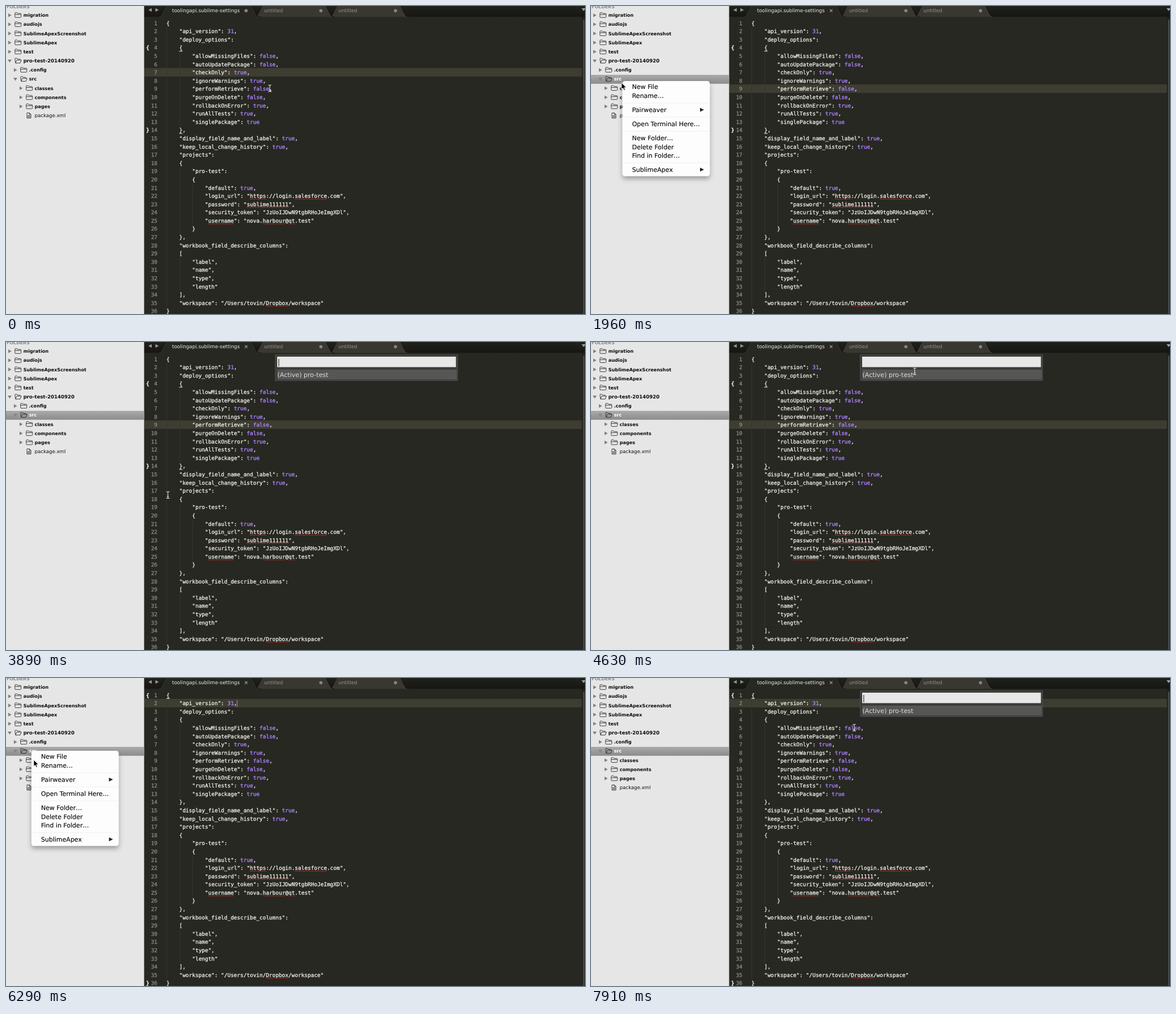
An HTML page that plays this animation: 1025x546 px, repeating every 8000 ms.

```html
<!DOCTYPE html>
<html lang="en">
<head>
<meta charset="utf-8">
<title>Editor session</title>
<style>
html, body { margin: 0; width: 100%; height: 100%; overflow: hidden; background: #272822; }
svg { display: block; width: 1025px; height: 546px; text-rendering: geometricPrecision; }
.code { font: 9.45px "DejaVu Sans Mono", monospace; fill: #f8f8f2; stroke: #f8f8f2; stroke-width: .25px; }
.ui { font-family: "DejaVu Sans", sans-serif; }
.no { fill: #90918b; stroke: #90918b; text-anchor: end; }
.val { fill: #ae81ff; stroke: #ae81ff; stroke-width: .35px; }
.menu { font-size: 11.02px; }
.menu text { stroke-width: .15px; }
</style>
</head>
<body>
<svg id="stage" viewBox="0 0 1025 546" xmlns="http://www.w3.org/2000/svg">
<defs>
  <linearGradient id="row" x2="0" y2="1"><stop stop-color="#ababab"/><stop offset="1" stop-color="#8b8b8b"/></linearGradient>
  <linearGradient id="blue" x2="0" y2="1"><stop stop-color="#5186f6"/><stop offset="1" stop-color="#1b55ee"/></linearGradient>
  <linearGradient id="bar" x2="0" y2="1"><stop stop-color="#21221d"/><stop offset="1" stop-color="#151612"/></linearGradient>
  <filter id="shade" x="-20%" y="-20%" width="140%" height="160%"><feDropShadow dx="0" dy="5" stdDeviation="4" flood-opacity=".32"/></filter>
</defs>
</svg>
<script>
const LOOP = 8000, X0 = 284, CW = 5.69, LH = 14.59, BASE = 33.7;
const stage = document.getElementById('stage');

const source = `{
    "api_version": 31,
    "deploy_options":
    {
        "allowMissingFiles": false,
        "autoUpdatePackage": false,
        "checkOnly": true,
        "ignoreWarnings": true,
        "performRetrieve": false,
        "purgeOnDelete": false,
        "rollbackOnError": true,
        "runAllTests": true,
        "singlePackage": true
    },
    "display_field_name_and_label": true,
    "keep_local_change_history": true,
    "projects":
    {
        "pro-test":
        {
            "default": true,
            "login_url": "https://login.salesforce.com",
            "password": "sublime111111",
            "security_token": "JzUoIJDwN9tgbRHoJeImgXDl",
            "username": "nova.harbour@qt.test"
        }
    },
    "workbook_field_describe_columns":
    [
        "label",
        "name",
        "type",
        "length"
    ],
    "workspace": "/Users/tovin/Dropbox/workspace"
}`.split('\n');

const baseline = n => BASE + (n - 1) * LH;
const colX = c => X0 + c * CW;
const rect = (x, y, w, h, fill, more = '') =>
  `<rect x="${x}" y="${y}" width="${w}" height="${h}" fill="${fill}" ${more}/>`;
const path = (d, more) => `<path d="${d}" ${more}/>`;
const text = (x, y, s, more = '') => `<text x="${x}" y="${y}" ${more}>${s}</text>`;
const dot = x => `<circle cx="${x}" cy="8.3" r="2.9" fill="#85857e"/>`;

function add(html, parent = stage) {
  const g = document.createElementNS('http://www.w3.org/2000/svg', 'g');
  g.innerHTML = html;
  parent.appendChild(g);
  return g;
}
const show = (el, on) => el.setAttribute('visibility', on ? 'inherit' : 'hidden');
const move = (el, x, y) => el.setAttribute('transform', `translate(${x} ${y})`);

// Editor
add(rect(244, 0, 781, 546, '#272822'));
const activeLine = add(rect(245, 0, 775, 15, '#3e3d32'));

const guide = (col, from, to) =>
  rect(Math.round(colX(col)), baseline(from) - 10.7, 1, (to - from + 1) * LH, '#34352e');
add(guide(0, 2, 35) + guide(4, 5, 13) + guide(4, 19, 26) + guide(4, 30, 33) + guide(8, 21, 25));

add(source.map((line, i) => {
  const body = line.trimStart(), y = baseline(i + 1);
  const marked = body.replace(/\b(true|false|31)\b(?=,|$)/, '<tspan class="val">$1</tspan>');
  return text(268, y, i + 1, 'class="no"') + text(colX(line.length - body.length), y, marked);
}).join('')).setAttribute('class', 'code');

const misspelt = [[22, 'https'], [22, 'salesforce'], [23, 'sublime111111'],
  [25, 'username'], [25, 'harbour'], [25, 'qt'], [35, 'Dropbox']];
add(misspelt.map(([n, word]) => {
  const x = colX(source[n - 1].indexOf(word)), y = baseline(n) + 2.2;
  return path(`M${x} ${y}h${word.length * CW}`, 'stroke="#e3211c" stroke-width="1.2" stroke-dasharray="2 1"');
}).join(''));

function bracketPair(open, close, col) {
  const end = (n, ch) => text(248, baseline(n), ch, 'font-weight="bold"') +
    rect(colX(col), baseline(n) + 2, CW, 1.1, '#f8f8f2', 'stroke="none"');
  const g = add(end(open, '{') + end(close, '}'));
  g.setAttribute('class', 'code');
  return g;
}
const innerPair = bracketPair(4, 14, 4);
const outerPair = bracketPair(1, 36, 0);
const caret = add(rect(408.6, 39.5, 1, 12, '#a5a59d'));
add(rect(1019.5, 20, 6, 526, '#20211c') + rect(1021.5, 24, 2.5, 522, '#4b4c47', 'rx="1.2"'));

// Tabs
function tab(l, r, fill, edge) {
  const d = `M${l - 8} 20C${l - 2} 20 ${l} 17 ${l + 2} 13L${l + 10} -3H${r - 10}` +
    `L${r - 2} 13C${r} 17 ${r + 2} 20 ${r + 8} 20`;
  return path(d, 'fill="none" stroke="#0e0f0b" stroke-width="2.4"') +
    path(d, `fill="${fill}" stroke="${edge}" stroke-width=".8"`);
}
add(rect(244, 0, 781, 19.5, 'url(#bar)') +
  tab(578, 706, '#383831', '#4c4c45') + tab(446, 574, '#383831', '#4c4c45') +
  tab(275, 443, '#272822', '#3f403a') +
  rect(244, 19.3, 775, 2, '#272822') +
  path('M258 3.7v6.6l-6-3.3zM264.5 3.7v6.6l6-3.3z', 'fill="#96968f"') +
  path('M1019 4h7l-3.5 5z', 'fill="#a5a59f"') +
  text(294, 11.3, 'toolingapi.sublime-settings', 'fill="#ecece6" font-size="8.84"') +
  text(457, 11.3, 'untitled', 'fill="#96968f" font-size="8.6"') +
  text(588.5, 11.3, 'untitled', 'fill="#96968f" font-size="8.6"') +
  dot(557.5) + dot(689.5)).setAttribute('class', 'ui');
const dirty = add(dot(425));
const clean = add(path('M422.8 6l4.6 4.6m0-4.6l-4.6 4.6', 'stroke="#a0a099" stroke-width="1.1"'));

// Sidebar: name, level, icon
const tree = [['migration', 0, 'shut'], ['audiojs', 0, 'shut'], ['SublimeApexScreenshot', 0, 'shut'],
  ['SublimeApex', 0, 'shut'], ['test', 0, 'shut'], ['pro-test-20140920', 0, 'open'],
  ['.config', 1, 'shut'], ['src', 1, 'open'], ['classes', 2, 'shut'],
  ['components', 2, 'shut'], ['pages', 2, 'shut'], ['package.xml', 2, 'file']];
const icons = {
  shut: 'M.5 -3.3q0 -1.2 1.2 -1.2h2.6l1.3 1.5h4.7q1.2 0 1.2 1.2v4.6q0 1.2 -1.2 1.2h-8.6q-1.2 0 -1.2 -1.2zM.5 -1.2h11',
  open: 'M1.6 4l-1.1 -7.3q0 -1.2 1.2 -1.2h2.4l1.3 1.5h3.6q1.2 0 1.2 1.8M1.6 4l2 -5.2h8.4l-2.2 5.2z',
  file: 'M1.8 -4.6h4.4l2.6 2.6v6.6h-7zM6 -4.6v2.8h2.8M3.6 .2h3.4v2.6h-3.4z'
};
function row(i, ink, line, tri) {
  const [name, lv, icon] = tree[i], y = 16.3 + i * 16.17, x = lv * 10;
  const arrow = icon === 'open' ? `M${x + 3} ${y - 2.2}h7l-3.5 5.4z` : `M${x + 4} ${y - 3.2}v6.6l5.6 -3.3z`;
  const file = icon === 'file', size = file ? 8.6 : lv === 0 && icon === 'open' ? 8.6 : 8.15;
  return (file ? '' : path(arrow, `fill="${tri}"`)) +
    path(icons[icon], `transform="translate(${x + 15.3} ${y})" fill="none" stroke="${line}" stroke-linejoin="round"`) +
    text(x + 30.7, y + 3, name, `fill="${ink}" font-size="${size}" ${file ? '' : 'font-weight="bold"'}`);
}
add(rect(0, 0, 244.5, 546, '#e6e6e6') +
  text(1, 4.3, 'FOLDERS', 'font-size="7.9" font-weight="bold" fill="#85898f"') +
  tree.map((_, i) => row(i, '#0c0c0c', '#3c3c3c', '#808080')).join('')).setAttribute('class', 'ui');
const picked = add(rect(0, 122, 244.5, 15.8, 'url(#row)') + row(7, '#fff', '#333', '#858585'));
picked.setAttribute('class', 'ui');

// Quick panel
const panel = add(rect(476.5, 22.5, 323, 46, '#3c3c3b', 'stroke="#4c4c49"') +
  rect(480, 26, 316.5, 18.5, '#e7e7e7') + rect(480, 49, 318, 17.5, '#565656') +
  text(480.5, 61.7, '(Active) pro-test', 'font-size="11.1" fill="#dcdcdc"'));
panel.setAttribute('class', 'ui');
const panelCaret = add(rect(482.4, 30, 1, 13, '#111'), panel);

// Context menu
const items = [['New File', 10], ['Rename…', 26], ['Pairweaver', 51, 1], ['Open Terminal Here…', 76],
  ['New Folder…', 101], ['Delete Folder', 116.7], ['Find in Folder…', 132], ['SublimeApex', 157, 1]];
const label = (x, y, s, ink) => text(x, y + 4, s, `fill="${ink}" stroke="${ink}"`);
const more = (y, fill) => path(`M137.3 ${y - 3.5}v7l7 -3.5z`, `fill="${fill}"`);
const menu = add('');
menu.setAttribute('class', 'ui menu');
add(rect(0, 0, 154.5, 168.5, '#fdfdfd', 'rx="4.5" filter="url(#shade)"') +
  [39, 64, 89, 145].map(y => rect(1, y - .5, 152.5, 1, '#f0f0f0')).join('') +
  items.map(([s, y, sub]) => label(17, y, s, '#0c0c0c') + (sub ? more(y, '#222') : '')).join(''), menu);
const apexRow = add(rect(0, 149, 154.5, 15.8, 'url(#blue)') + label(17, 157, 'SublimeApex', '#fff') + more(157, '#fff'), menu);
const sub = add(rect(154.5, 147, 173, 36.7, '#f9f9f9', 'rx="4" filter="url(#shade)"') +
  label(171.5, 157, 'Deploy Package To Server', '#0c0c0c') +
  label(171.5, 172.3, 'Deploy Files To Server', '#969696'), menu);
sub.setAttribute('font-size', 10.75);
const deployRow = add(rect(154.5, 149, 173, 15.8, 'url(#blue)') +
  label(171.5, 157, 'Deploy Package To Server', '#fff'), sub);

// Pointers
const beam = add(path('M-2.8 -6q2.8 0 2.8 2v8q0 2 -2.8 2M2.8 -6q-2.8 0 -2.8 2v8q0 2 2.8 2M-1.5 2.5h3',
  'fill="none" stroke="#deded8" stroke-width="1.1"'));
const arrow = add(path('M0 0V11.8L2.7 9.3L4.5 13.4L6.5 12.5L4.8 8.6H8.4Z',
  'fill="#000" stroke="#fff" stroke-width=".9" stroke-linejoin="round"'));

const runs = [[140, 1070, 7], [1220, 2260, 8], [2410, 3440, 8], [3740, 4780, 8],
  [4930, 5850, 7], [6000, 7020, 8], [7170, 7320, 2], [7620, 7910, 3]];
function snap(t) {
  let last = 0;
  for (const [a, b, n] of runs) {
    if (t < a) break;
    const gap = (b - a) / (n - 1);
    last = Math.min(b, a + Math.floor((t - a + 5) / gap) * gap);
  }
  return last;
}

// Pointer stops: time, x, y
const stops = [[0, 467, 146], [1070, 467, 146], [1800, 55, 134], [1960, 54, 136], [2260, 88, 242],
  [2700, 130, 288], [3145, 189, 289], [3440, 262, 290], [3740, 262, 290], [4600, 573, 52],
  [4780, 573, 52], [5550, 40, 150], [5850, 44, 130], [6000, 44, 130], [6290, 49, 145],
  [6720, 112, 278], [7020, 153, 283], [7320, 273, 280], [7620, 273, 280], [7910, 466, 88], [LOOP, 466, 88]];
function pointer(t) {
  let i = 0;
  while (i < stops.length - 2 && t >= stops[i + 1][0]) i++;
  const [a, x, y] = stops[i], [b, u, v] = stops[i + 1];
  const k = Math.min(1, (t - a) / (b - a)), e = k * k * (3 - 2 * k);
  return [x + (u - x) * e, y + (v - y) * e];
}
const within = (t, a, b) => t >= a - 5 && t < b - 5;
const blink = age => Math.floor(age / 530) % 2 === 0;

function draw(now) {
  const t = snap(now), [x, y] = pointer(t);
  const first = within(t, 1810, 3740), second = within(t, 6000, 7620);
  const [mx, my] = first ? [55.7, 133] : [45, 129];
  const menuOn = first || second, atTop = t >= 4775;
  const overApex = menuOn && y > my + 148;

  move(activeLine, 0, Math.round(baseline(t < 135 ? 7 : atTop ? 2 : 9) - 11));
  show(innerPair, !atTop);
  show(outerPair, atTop);
  show(dirty, t < 885);
  show(clean, t >= 885);
  show(picked, within(t, 1810, 4780) || t >= 5995);

  const firstPanel = within(t, 3888, 4780), panelOn = firstPanel || t >= 7760;
  show(panel, panelOn);
  show(panelCaret, panelOn && blink(t - (firstPanel ? 3880 : 7760)));
  show(caret, atTop && !panelOn && blink(t - 4775));

  show(menu, menuOn);
  move(menu, mx, my);
  show(apexRow, overApex);
  show(sub, overApex);
  show(deployRow, overApex && x > mx + 154.5);

  const typing = x > 245 && !menuOn;
  show(beam, typing);
  show(arrow, !typing);
  move(typing ? beam : arrow, x, y);
}

const began = performance.now();
function loop() {
  draw((performance.now() - began) % LOOP);
  requestAnimationFrame(loop);
}
loop();
</script>
</body>
</html>
```
